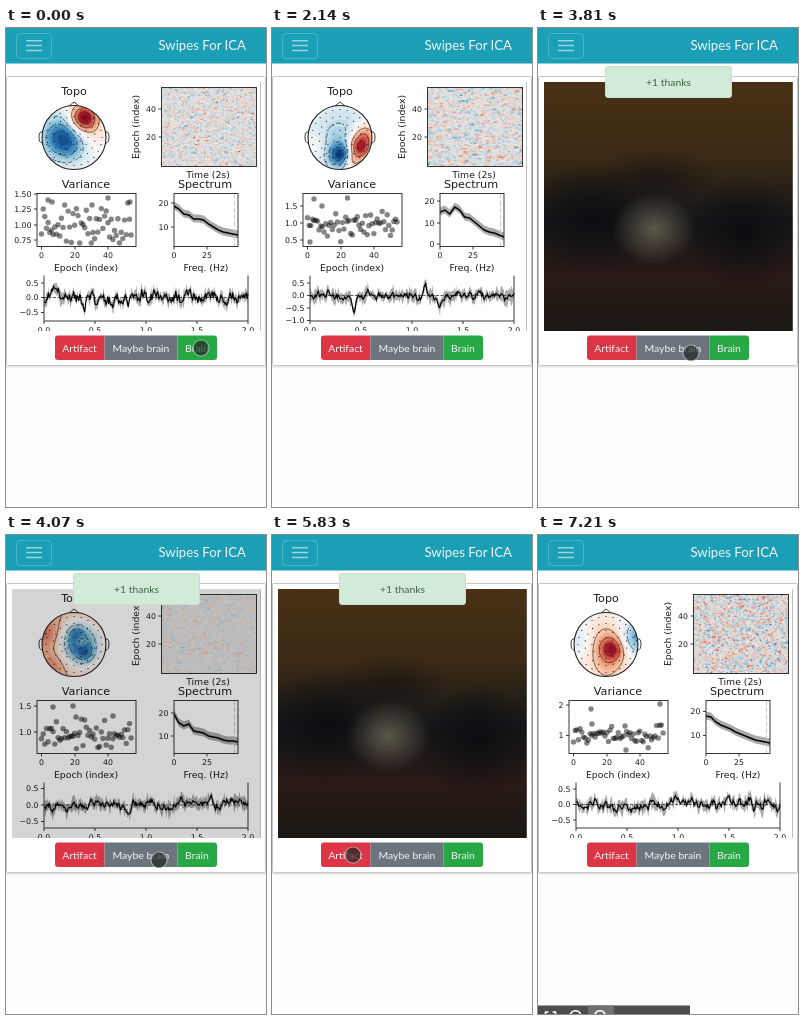
An HTML page for the animation above (7350 ms loop, 260 by 479 pixels).

```html
<!DOCTYPE html>
<html lang="en">
<head>
<meta charset="utf-8">
<title>Swipes For ICA</title>
<style>
html, body { margin: 0; width: 100%; height: 100%; overflow: hidden; background: #fdfdfd; }
svg { display: block; width: 100vw; height: 100vh; }
.ui { font-family: Lato, sans-serif; font-size: 10.4px; fill: #f4f4f4; text-anchor: middle; }
.plot { font-family: "DejaVu Sans", sans-serif; fill: #1c1c1c; text-anchor: middle; }
.tick { font-size: 7.8px; }
.label { font-size: 9.3px; }
.title { font-size: 11.2px; }
.end { text-anchor: end; }
.axis { fill: none; stroke: #222; stroke-width: .9; }
</style>
</head>
<body>
<svg viewBox="0 0 260 479" preserveAspectRatio="none">
  <defs>
    <clipPath id="panelClip"><rect x="6" y="54" width="248.5" height="249"/></clipPath>
    <clipPath id="headClip"><circle cx="68" cy="109.5" r="32"/></clipPath>
    <clipPath id="specClip"><rect x="168" y="165.5" width="64" height="53"/></clipPath>
    <linearGradient id="dusk" x2="0" y2="1">
      <stop offset="0" stop-color="#493216"/><stop offset=".3" stop-color="#3a2915"/>
      <stop offset=".55" stop-color="#15171a"/><stop offset=".78" stop-color="#2a1a15"/>
      <stop offset="1" stop-color="#1b1813"/>
    </linearGradient>
    <radialGradient id="glow"><stop offset="0" stop-color="#5d584b"/><stop offset="1" stop-color="#5d584b" stop-opacity="0"/></radialGradient>
    <radialGradient id="shade"><stop offset="0" stop-color="#0c0d10"/><stop offset="1" stop-color="#0c0d10" stop-opacity="0"/></radialGradient>
  </defs>
  <rect width="260" height="479" fill="#fdfdfd"/>
  <rect width="260" height="35.5" fill="#1a9fb6"/>
  <g id="scene">
    <rect id="menuBox" x="10.5" y="5.5" width="35" height="25" rx="3.5" fill="none" stroke="#fff" stroke-opacity=".2"/>
    <path d="M20 12.8h16M20 17.6h16M20 22.4h16" stroke="#fff" stroke-opacity=".55" stroke-width="1.5"/>
    <text class="ui" x="240" y="21.7" style="font-size:13.2px;text-anchor:end">Swipes For ICA</text>
    <path d="M0 338.6H260" stroke="#000" stroke-opacity=".1" stroke-width="1.6"/>
    <rect x=".5" y="48.5" width="259" height="289" rx="1" fill="#fff" stroke="#c6c6c6"/>
    <rect x="6" y="54" width="248.5" height="249"/>
    <g id="plots" clip-path="url(#panelClip)"></g>
    <g id="murk" clip-path="url(#panelClip)">
      <rect x="6" y="54" width="249" height="249" fill="url(#dusk)"/>
      <ellipse cx="55" cy="190" rx="70" ry="55" fill="url(#shade)"/>
      <ellipse cx="205" cy="205" rx="60" ry="55" fill="url(#shade)"/>
      <ellipse cx="118" cy="150" rx="60" ry="30" fill="url(#shade)" opacity=".5"/>
      <ellipse cx="116" cy="201" rx="42" ry="36" fill="url(#glow)"/>
    </g>
    <path d="M98.5 307.5H52q-3 0-3 3v18.500q0 3 3 3h46.500z" fill="#dc3545"/>
    <rect x="98.500" y="307.500" width="73" height="24.500" fill="#6c757d"/>
    <path d="M171.500 307.500H208q3 0 3 3v18.500q0 3-3 3h-36.500z" fill="#28a745"/>
    <text class="ui" x="73.500" y="323.500">Artifact</text>
    <text class="ui" x="135" y="323.500">Maybe brain</text>
    <text class="ui" x="191" y="323.500">Brain</text>
    <g id="toast">
      <rect x="67.500" y="38.500" width="126" height="31" rx="2.500" fill="#d2ebd9" stroke="#c3e2cb"/>
      <text class="ui" x="130.500" y="57.500" style="fill:#3b6547">+1 thanks</text>
    </g>
    <circle id="cursor" fill="#1e2322" fill-opacity=".68" stroke="#e4e8e6" stroke-opacity=".55" stroke-width="1.200"/>
  </g>
  <g id="controls">
    <path d="M0 470.500H152V479H0z" fill="#4d4d4d"/>
    <path d="M50 470.500H76V479H50z" fill="#707070"/>
    <path d="M7.500 479v-2h3M14.500 477h3v2M32.500 479a5.500 5.500 0 0 1 10 0M57 479a5.500 5.500 0 0 1 10 0" fill="none" stroke="#fff" stroke-width="1.600"/>
  </g>
</svg>
<script>
const LOOP = 7350;
const $ = id => document.getElementById(id);

// Diverging palette from blue through white to red
const PALETTE = ['#053061', '#2166ac', '#4393c3', '#92c5de', '#d1e5f0', '#f7f7f7',
  '#fddbc7', '#f4a582', '#d6604d', '#b2182b', '#67001f']
  .map(h => [1, 3, 5].map(i => parseInt(h.slice(i, i + 2), 16)));

// blobs: [u, v, spread, strength] in units of the head radius
const PLOTS = [
  { seed: 11, base: -.06, blobs: [[-.4, 0, .42, -.78], [-.1, .35, .3, -.2], [.3, -.6, .3, 1.05], [.75, 0, .35, .14]],
    heat: .24, streak: .35,
    varTicks: [['1.50', 166], ['1.25', 181], ['1.00', 197], ['0.75', 212]], mean: 197, sd: 10,
    extra: [[42, 172], [46, 174], [102, 170], [124, 174], [86, 177]],
    spec: [178, 181, 186, 187, 191, 191, 192, 196, 199, 202, 204, 205, 206, 207], specTicks: [[20, 175], [10, 199]],
    sigTicks: [['0.5', 255], ['0.0', 269.5], ['−0.5', 284.500]], amp: 5.5, bumps: [[87, -15], [78, 9], [200, -6]] },
  { seed: 23, base: -.12, blobs: [[.6, .32, .27, .95], [.78, -.12, .25, .45], [.35, .75, .2, .4], [0, .55, .25, -.85], [0, 0, .45, -.22], [-.85, .3, .3, .15]],
    heat: .2, streak: .65,
    varTicks: [['1.5', 178], ['1.0', 195], ['0.5', 212]], mean: 197, sd: 8,
    extra: [[42, 171], [50, 178], [75.5, 170], [38, 214]],
    spec: [184, 182, 186, 179, 182, 189, 190, 194, 198, 202, 204, 205, 207, 209], specTicks: [[20, 173], [10, 195], [0, 216]],
    sigTicks: [['0.5', 255], ['0.0', 267.5], ['−0.5', 280], ['−1.0', 292.5]], amp: 3, bumps: [[82, 17], [153, -11], [168, 10], [96, -5]] },
  { seed: 37, base: .3, blobs: [[.15, 0, .48, -1], [.05, -.35, .2, -.3], [.35, .3, .2, -.3], [.2, -.1, .12, .35], [-.75, -.3, .35, .3], [-.6, .6, .3, .25]],
    heat: .1, streak: .6, 
    varTicks: [['1.5', 171], ['1.0', 197]], mean: 201, sd: 7,
    extra: [[47, 172], [67, 171], [107, 181], [70, 182]],
    spec: [179, 188, 191, 189, 196, 197, 198, 201, 202, 203, 205, 206, 206, 207], specTicks: [[20, 178], [10, 201]],
    sigTicks: [['0.5', 253.5], ['0.0', 270], ['−0.5', 286.5]], amp: 3.8, bumps: [[123, 9], [175, -7], [205, -5]] },
  { seed: 53, base: .04, blobs: [[.18, .15, .25, .5], [.1, .05, .5, .42], [.95, -.2, .4, -.65], [-.85, -.1, .35, -.22], [0, .8, .3, .15]],
    heat: .3, streak: .4,
    varTicks: [['2', 170], ['1', 200.5]], mean: 200, sd: 5,
    extra: [[53, 174], [122, 169], [88, 215], [54, 189]],
    spec: [181, 182, 187, 190, 192, 194, 197, 199, 201, 203, 205, 206, 207, 208], specTicks: [[20, 176.5], [10, 200.5]],
    sigTicks: [['0.5', 254], ['0.0', 269.5], ['−0.5', 285]], amp: 4.2, bumps: [[190, -9], [126, 7], [110, 7], [215, 6]] }
];

function randomFrom(seed) {
  return () => (seed = (seed * 16807) % 2147483647) / 2147483647;
}
const gaussFrom = random => () => random() + random() + random() + random() - 2;
const clamp = (v, lo, hi) => Math.max(lo, Math.min(hi, v));

function paletteColor(v) {
  const p = (clamp(v, -1, 1) + 1) * 5, i = Math.min(9, Math.floor(p));
  return `rgb(${PALETTE[i].map((c, k) => Math.round(c + (PALETTE[i + 1][k] - c) * (p - i)))})`;
}

// One path per colour step keeps a dense grid light
function heatmap(value, x0, y0, cols, rows, rowHeight) {
  const paths = {};
  for (let r = 0; r < rows; r++)
    for (let c = 0; c < cols; c++) {
      const level = Math.round(clamp(value(c, r), -1, 1) * 16);
      paths[level] = (paths[level] || '') + `M${x0 + c} ${(y0 + (r + .5) * rowHeight).toFixed(2)}h1.05`;
    }
  return Object.entries(paths).map(([level, d]) =>
    `<path d="${d}" stroke="${paletteColor(level / 16)}" stroke-width="${rowHeight + .05}"/>`).join('');
}

function contour(field, level) {
  let d = '';
  const corner = (x, y) => ({ x, y, v: field(x, y) });
  const cross = (points, dashGap) => {
    const hits = [];
    points.forEach((a, i) => {
      const b = points[(i + 1) % 3];
      if ((a.v < level) === (b.v < level)) return;
      const k = (level - a.v) / (b.v - a.v);
      hits.push(`${(a.x + (b.x - a.x) * k).toFixed(1)} ${(a.y + (b.y - a.y) * k).toFixed(1)}`);
    });
    if (hits.length && !dashGap) d += `M${hits[0]}L${hits[1]}`;
  };
  for (let x = 36; x < 100; x += 2)
    for (let y = 77; y < 142; y += 2) {
      const a = corner(x, y), b = corner(x + 2, y), c = corner(x, y + 2), e = corner(x + 2, y + 2);
      const gap = level < 0 && (x + y - 1) / 2 % 3 < 1;
      cross([a, b, c], gap);
      cross([b, c, e], gap);
    }
  return `<path d="${d}" stroke="#222" stroke-width=".65" fill="none"/>`;
}

const text = (cls, x, y, s, extra = '') => `<text class="${cls}" x="${x}" y="${y}" ${extra}>${s}</text>`;
const yTicks = (ticks, x) => ticks.map(([s, y]) =>
  `<path class="axis" d="M${x} ${y}h-3"/>` + text('tick end', x - 5.5, y + 2.8, s)).join('');
const xTicks = (ticks, y) => ticks.map(([s, x]) =>
  `<path class="axis" d="M${x} ${y}v3"/>` + text('tick', x, y + 11.8, s)).join('');

function topo(p) {
  const field = (x, y) => p.blobs.reduce((sum, [u, v, s, a]) =>
    sum + a * Math.exp(-(((x - 68) / 32 - u) ** 2 + ((y - 109.5) / 32 - v) ** 2) / (2 * s * s)), p.base);
  let dots = 'M68 109.5h0';
  for (let ring = 1; ring < 5; ring++)
    for (let k = 0; k < ring * 6; k++) {
      const a = k / ring / 6 * 2 * Math.PI, r = ring * 7;
      dots += `M${(68 + r * Math.sin(a)).toFixed(1)} ${(109.5 - r * Math.cos(a)).toFixed(1)}h0`;
    }
  return text('title', 68, 66.500, 'Topo') +
    '<path class="axis" d="M63 78L68 74L73 78M36.500 104q-3.500-1-3.500 5t3.500 6M99.500 104q3.500-1 3.500 5t-3.500 6"/>' +
    `<g clip-path="url(#headClip)">${heatmap((c, r) => field(36 + c, 77.5 + r), 36, 77, 64, 65, 1)}` +
    [-.75, -.5, -.25, .25, .5, .75].map(l => contour(field, l)).join('') + '</g>' +
    `<path d="${dots}" stroke="#111" stroke-width="1.200" stroke-linecap="round"/>` +
    '<circle class="axis" cx="68" cy="109.500" r="32" style="stroke-width:1.100"/>';
}

function epochs(p, gauss) {
  let last = 0;
  const noise = () => last = last * p.streak + gauss() * p.heat * 1.5;
  return `<rect x="155.500" y="59.500" width="95" height="79" fill="#eee"/>` +
    heatmap(noise, 155.5, 59.5, 95, 56, 79 / 56) +
    '<rect x="155.500" y="59.500" width="95" height="79" fill="#8d8680" fill-opacity=".12"/>' +
    '<rect class="axis" x="155.500" y="59.500" width="95" height="79"/>' +
    yTicks([[40, 81], [20, 109]], 155.5) +
    text('label', 0, 0, 'Epoch (index)', 'transform="translate(133 99) rotate(-90)"') +
    text('label', 202, 150, 'Time (2s)');
}

function variance(p, gauss) {
  const dot = (x, y) => `<circle cx="${x.toFixed(1)}" cy="${y.toFixed(1)}" r="2.700"/>`;
  let dots = p.extra.map(([x, y]) => dot(x, y)).join('');
  for (let i = 0; i < 55; i++) dots += dot(35.5 + i * 1.66, clamp(p.mean + gauss() * p.sd * 1.7, 172, 215));
  return text('title', 80, 160, 'Variance') + `<g fill="#000" fill-opacity=".48">${dots}</g>` +
    '<rect class="axis" x="31" y="165.500" width="99" height="53"/>' +
    yTicks(p.varTicks, 31) + xTicks([[0, 35.5], [20, 69], [40, 102]], 218.5) +
    text('label', 80, 242.500, 'Epoch (index)');
}

function spectrum(p) {
  const line = (offset, list = p.spec.map((y, i) => [168 + i * 64 / 13, y])) =>
    list.map(([x, y]) => `${x.toFixed(1)} ${y + offset}`);
  return text('title', 199, 160, 'Spectrum') + '<g clip-path="url(#specClip)">' +
    `<path d="M${line(-4.500).join('L')}L${line(3.500).reverse().join('L')}z" fill="#aaa"/>` +
    '<path d="M228.500 165.500V218" stroke="#c8c8c8" stroke-dasharray="5 2"/>' +
    `<path d="M${line(0).join('L')}" fill="none" stroke="#000" stroke-width="1.500"/></g>` +
    '<rect class="axis" x="168" y="165.500" width="64" height="53"/>' +
    yTicks(p.specTicks, 168) + xTicks([[0, 168], [25, 201]], 218.5) +
    text('label', 200, 242.500, 'Freq. (Hz)');
}

function signal(p, gauss) {
  const zero = p.sigTicks[1][1], mid = [], top = [], bottom = [];
  let wave = 0;
  for (let x = 38; x <= 242; x += .85) {
    wave = wave * .72 + gauss() * p.amp * .95;
    const bump = p.bumps.reduce((s, [at, h]) => s + h * Math.exp(-(((x - at) / 2.2) ** 2)), 0);
    const y = clamp(zero + wave + bump, 252, 289), spread = 5 + gauss() * 3.5;
    const point = v => `${x.toFixed(1)} ${v.toFixed(1)}`;
    mid.push(point(y));
    top.push(point(Math.max(248, y - spread)));
    bottom.unshift(point(Math.min(292, y + spread)));
  }
  return `<path d="M${top.join('L')}L${bottom.join('L')}z" fill="#a9a9a9"/>` +
    `<path d="M38 ${zero}H242" stroke="#333" stroke-width=".8" stroke-dasharray="3 1.500"/>` +
    `<path d="M${mid.join('L')}" fill="none" stroke="#000" stroke-width="1.150"/>` +
    '<path class="axis" d="M38 247.500V293H242V247.500"/>' + yTicks(p.sigTicks, 38) +
    xTicks([['0.0', 38], ['0.5', 89], ['1.0', 140], ['1.5', 191], ['2.0', 242]], 293);
}

function drawPlot(p) {
  const gauss = gaussFrom(randomFrom(p.seed * 7919));
  return '<g class="plot"><rect x="6" y="54" width="249" height="249" fill="#fff"/>' +
    topo(p) + epochs(p, gauss) + variance(p, gauss) + spectrum(p) + signal(p, gauss) + '</g>';
}

$('plots').innerHTML = PLOTS.map(drawPlot).join('');
const plotGroups = [...$('plots').children];

// Each row: start time, then the values held until the next row
const CURSOR = [[0, 195, 320, 8], [140, 198.5, 321.5, 8], [970, 194.5, 320.5, 12.500], [1670, 194.5, 320, 8],
  [2010, 0, 0, 0], [2950, 179.5, 322, 8], [3310, 153.5, 323.5, 8], [3610, 153, 326, 12.500],
  [3810, 153, 325, 8], [4820, 152, 325, 8], [5390, 116, 323, 8], [5530, 81, 320.5, 8],
  [5670, 81, 320, 12.500], [5830, 81, 320, 8], [6390, 78, 338, 8], [6520, 74, 362, 8],
  [6660, 62, 412, 8], [6800, 50, 459, 8], [6930, 0, 0, 0]];
const IMAGE = [[0, 0, 1], [1670, 1, 0], [1880, 1, .45], [2010, 1, .83], [2140, 1, 1],
  [3810, 2, 0], [3940, 2, .45], [4070, 2, .83], [4200, 2, 1],
  [5830, 3, 0], [5960, 3, .45], [6090, 3, .83], [6220, 3, 1]];
const TOAST = [[1670, 2140], [3810, 4360], [5830, 6220]];
const MURK = [[3810, 3940], [5830, 5960]];
const SOFT = [[4820, 5250]];
const CONTROLS = [[7210, LOOP]];

const hold = (rows, t) => rows.filter(row => row[0] <= t).pop().slice(1);
const during = (spans, t) => spans.some(([from, to]) => t >= from && t < to);
const show = (node, on) => node.setAttribute('visibility', on ? 'visible' : 'hidden');

function render(t) {
  const [index, alpha] = hold(IMAGE, t), [x, y, r] = hold(CURSOR, t), soft = during(SOFT, t);
  plotGroups.forEach((group, i) => {
    group.style.display = i === index ? '' : 'none';
    group.setAttribute('opacity', alpha);
  });
  const cursor = $('cursor');
  cursor.setAttribute('cx', x);
  cursor.setAttribute('cy', y);
  cursor.setAttribute('r', r);
  show(cursor, r > 0);
  show($('toast'), during(TOAST, t));
  show($('murk'), during(MURK, t));
  show($('controls'), during(CONTROLS, t));
  show($('menuBox'), !soft);
  $('scene').style.filter = soft ? 'blur(.45px)' : 'none';
}

const start = performance.now();
function tick() {
  render((performance.now() - start) % LOOP);
  requestAnimationFrame(tick);
}
tick();
</script>
</body>
</html>
```
